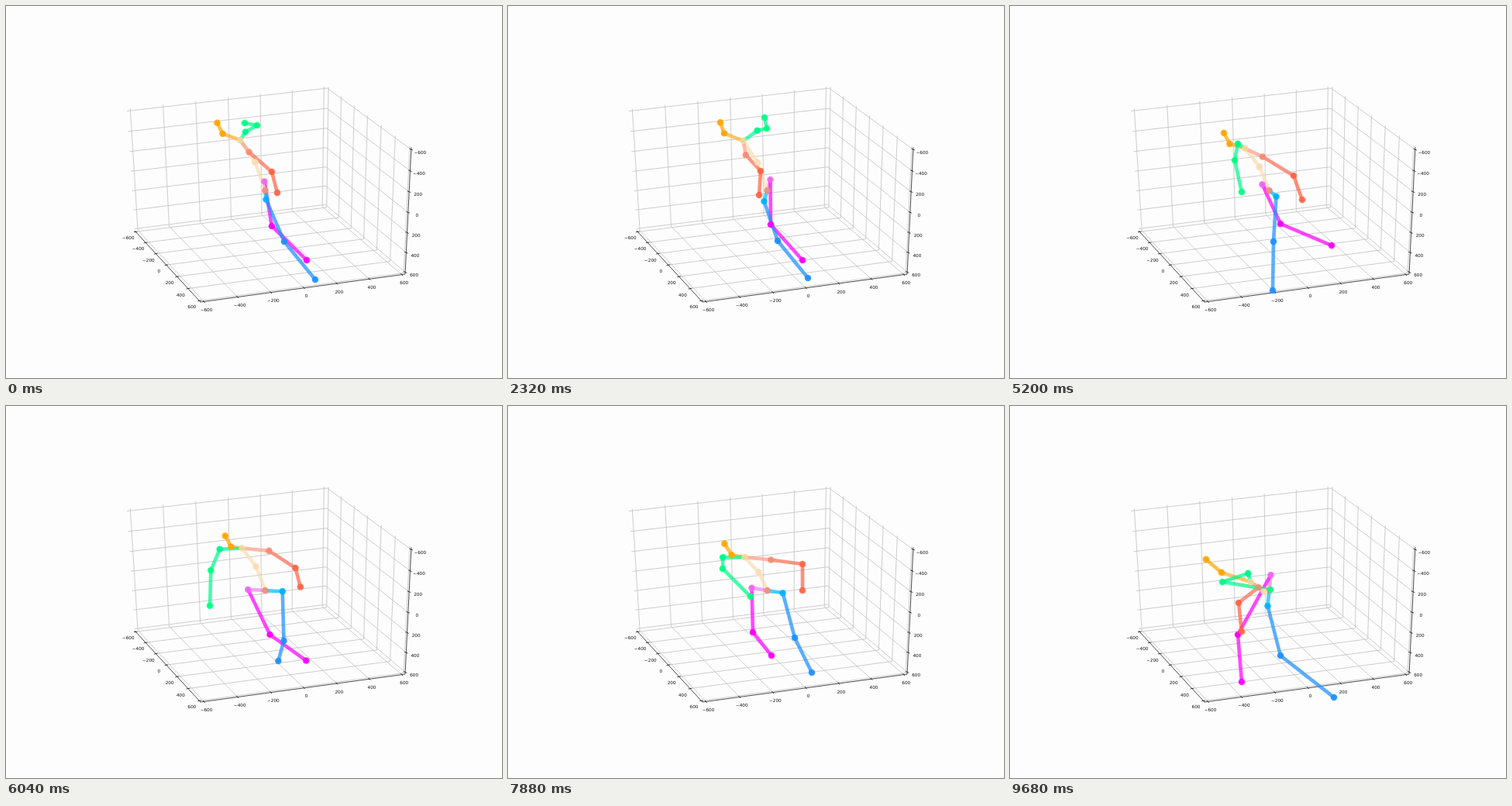
Animation, 640 px wide and 480 px high, one loop 9720 ms. Source, as an HTML page with a canvas:

```html
<!DOCTYPE html>
<html lang="en">
<head>
<meta charset="utf-8">
<title>Moving skeleton</title>
<style>
html, body { margin: 0; width: 100%; height: 100%; overflow: hidden; background: #fdfdfd; }
canvas { display: block; width: 640px; height: 480px; }
</style>
</head>
<body>
<canvas id="stage" width="640" height="480"></canvas>
<script>
const LOOP = 9720, STEP = 40;
const ctx = document.getElementById('stage').getContext('2d');

function line(c, p, q) {
  c.beginPath();
  c.moveTo(p[0], p[1]);
  c.lineTo(q[0], q[1]);
  c.stroke();
}

// ---- plot box ----
// Perspective view of the unit box: x to the right, y to the front, z up.
function project(x, y, z) {
  const w = 1 + 0.0213 * x - 0.0757 * y - 0.0478 * z;
  return [
    (166 + 255 * x + 66 * y - 17.5 * z) / w,
    (290 - 25.9 * x + 63.1 * y - 163.5 * z) / w
  ];
}

function drawPlot(c) {
  const span = (...ends) => line(c, project(...ends[0]), project(...ends[1]));
  const ticks = Array.from({ length: 7 }, (_, i) => 0.0165 + 0.967 * i / 6);

  c.lineWidth = 0.75;
  c.strokeStyle = '#bcbcbc';
  for (const k of ticks) {
    span([k, 1, 0], [k, 0, 0]);
    span([k, 0, 0], [k, 0, 1]);
    span([0, k, 0], [1, k, 0]);
    span([1, k, 0], [1, k, 1]);
    span([0, 0, k], [1, 0, k]);
    span([1, 0, k], [1, 1, k]);
  }

  c.strokeStyle = c.fillStyle = '#111';
  span([0, 0, 0], [0, 1, 0]);
  span([0, 1, 0], [1, 1, 0]);
  span([1, 1, 0], [1, 1, 1]);

  c.font = '5.7px "DejaVu Sans", sans-serif';
  c.textAlign = 'center';
  c.textBaseline = 'middle';
  const mark = ([x, y], dx, dy, text, tx, ty) => {
    line(c, [x - dx, y - dy], [x + dx, y + dy]);
    c.fillText(text, x + tx, y + ty);
  };
  ticks.forEach((k, i) => {
    const value = i * 200 - 600;
    const text = String(value).replace('-', '\u2212');
    mark(project(k, 1, 0), 1.3, 1.5, text, 3, 11);
    mark(project(0, k, 0), 2.3, -0.4, text, -9.5, 8.5);
    // The third height label carries no sign.
    mark(project(1, 1, 1 - k), 2.2, 0.9, value === -200 ? '200' : text, 11.5, 4);
  });
}

const plot = document.createElement('canvas');
plot.width = 640;
plot.height = 480;
drawPlot(plot.getContext('2d'));

// ---- motion ----
// Key poses: body turn, forward bow, and the two free joints of each limb.
const POSES = [
  { t: 3840, turn: 1, bow: 0,
    legR: [343, 284, 388, 328], legL: [359, 304, 399, 353],
    armR: [343, 214, 350, 241], armL: [324, 154, 308, 151] },
  { t: 5200, turn: 9, bow: 0.2,
    legR: [349, 281, 415, 309], legL: [340, 304, 339, 361],
    armR: [366, 219, 377, 250], armL: [290, 199, 299, 240] },
  { t: 6880, turn: 32, bow: 0.19,
    legR: [327, 309, 352, 348], legL: [377, 301, 372, 297],
    armR: [378, 199, 381, 217], armL: [249, 218, 232, 265] },
  { t: 7880, turn: 20, bow: 0.41,
    legR: [316, 292, 340, 322], legL: [370, 299, 392, 344],
    armR: [380, 204, 380, 238], armL: [277, 210, 313, 246] },
  { t: 9680, turn: -2, bow: 1,
    legR: [294, 295, 299, 356], legL: [349, 322, 418, 376],
    armR: [295, 254, 299, 291], armL: [274, 227, 336, 237] }
];

// How far a full sway moves each limb while standing.
const SWAY = {
  legR: [-4, -2, -8, 0], legL: [-11, -1, -12, -2],
  armR: [-17, -1, -26, 3], armL: [10, 4, 23, -7]
};

const clamp = (v, a, b) => Math.min(b, Math.max(a, v));
const phase = (t, a, b) => clamp((t - a) / (b - a), 0, 1);
const smooth = (t, a, b) => {
  const u = phase(t, a, b);
  return u * u * (3 - 2 * u);
};
const arc = (t, a, b) => Math.sin(Math.PI * phase(t, a, b));

// Monotone cubic between the poses, at rest at both ends.
function tween(get, t) {
  const last = POSES.length - 1;
  t = clamp(t, POSES[0].t, POSES[last].t);
  let i = 0;
  while (i < last - 1 && t >= POSES[i + 1].t) i++;
  const secant = j => (get(POSES[j + 1]) - get(POSES[j])) / (POSES[j + 1].t - POSES[j].t);
  const slope = j => {
    if (j === 0 || j === last) return 0;
    const a = secant(j - 1), b = secant(j);
    return a * b > 0 ? 2 * a * b / (a + b) : 0;
  };
  const h = POSES[i + 1].t - POSES[i].t;
  const u = (t - POSES[i].t) / h, v = 1 - u;
  return get(POSES[i]) * v * v * (1 + 2 * u) + get(POSES[i + 1]) * u * u * (3 - 2 * u)
    + h * u * v * (slope(i) * v - slope(i + 1) * u);
}

const add = ([x, y], dx, dy) => [x + dx, y + dy];
const mirror = (p, c) => [2 * c[0] - p[0], 2 * c[1] - p[1]];

function pose(t) {
  const sway = smooth(t, 0, 1000) - (smooth(t, 3000, 3840) + smooth(t, 3840, 5200)) / 2;
  const turn = tween(p => p.turn, t) - 5 * sway;
  const bow = tween(p => p.bow, t), bend = bow * bow;
  const limb = name => {
    const [x, y, ex, ey] = SWAY[name].map((s, i) => tween(p => p[name][i], t) + s * sway);
    return [[x, y], [ex, ey]];
  };

  const pelvis = [334.5, 238];
  const neck = [302 + 0.1 * turn + 9 * bend + 2 * sway, 173 + 54 * bow + sway];
  const spine = [(pelvis[0] + neck[0]) / 2 + 3 + 2 * bend,
    (pelvis[1] + neck[1]) / 2 - 4 + 11 * bend];
  const nose = add(neck, -23 + 0.42 * turn - 14 * bend, -8.5 + 0.3 * turn - 3 * bend);
  const head = add(nose, -7 - 13 * bend + 2 * sway, -14 - 3 * bend);

  // Both girdles turn about their centre, so one side mirrors the other.
  const hipR = add(pelvis, -turn, turn / 2 - 12 - 7 * bend);
  const hipL = mirror(hipR, pelvis);
  const chest = add(neck, 9.5 - 0.28 * turn - 7 * bend, 2.5 - 4.5 * bend);
  const shoulderR = add(neck, 10 + 1.6 * turn - 0.022 * turn * turn + 3 * bend,
    16 - 0.55 * turn - 10 * bend);
  const shoulderL = mirror(shoulderR, chest);

  const [kneeR, footR] = limb('legR');
  const [kneeL, stepL] = limb('legL');
  const [elbowR, handR] = limb('armR');
  const [elbowL, waveL] = limb('armL');
  const reach = arc(t, 3840, 5200);
  const handL = add(waveL, -46 * reach, -8 * reach);
  const footL = add(stepL, -30 * arc(t, 7880, 9680), 7 * arc(t, 4200, 5700));

  return { pelvis, neck, spine, nose, head, hipR, hipL, shoulderR, shoulderL,
    kneeR, footR, kneeL, footL, elbowR, handR, elbowL, handL };
}

// ---- drawing ----
// Each chain: bones from a start joint, as [joint, dot colour, bone colour].
const CHAINS = [
  ['pelvis', ['hipR', '#ee6cee', '#ee82ee'], ['kneeR', '#f800f8', '#ff00ff'],
    ['footR', '#f800f8', '#ff00ff']],
  ['pelvis', ['hipL', '#00b4ff', '#00bfff'], ['kneeL', '#1e90ff', '#1e90ff'],
    ['footL', '#1e90ff', '#1e90ff']],
  ['pelvis', ['pelvis', '#f08a78', '#f08a78'], ['spine', '#fbdcb4', '#fbdcb4'],
    ['neck', '#fad8a0', '#fbdcb4']],
  ['neck', ['shoulderR', '#f58c76', '#ffa088'], ['elbowR', '#ff6347', '#ff6f58'],
    ['handR', '#ff6347', '#ff6347']],
  ['neck', ['nose', '#ffa500', '#ffb02a'], ['head', '#ffa500', '#ffa500']],
  ['neck', ['shoulderL', '#00f58a', '#00fa9a'], ['elbowL', '#00ff7f', '#00fa8a'],
    ['handL', '#00ff7f', '#00fa8a']]
];

function draw(t) {
  const at = pose(t);

  ctx.globalAlpha = 1;
  ctx.fillStyle = '#fdfdfd';
  ctx.fillRect(0, 0, 640, 480);
  ctx.drawImage(plot, 0, 0);

  ctx.lineWidth = 4.6;
  ctx.lineCap = 'square';
  ctx.globalAlpha = 0.72;
  for (const [start, ...bones] of CHAINS) {
    let from = start;
    for (const [name, , color] of bones) {
      ctx.strokeStyle = color;
      if (name !== from) line(ctx, at[from], at[name]);
      from = name;
    }
  }
  ctx.globalAlpha = 0.88;
  for (const [, ...bones] of CHAINS) {
    for (const [name, color] of bones) {
      ctx.fillStyle = color;
      ctx.beginPath();
      ctx.arc(...at[name], 4.3, 0, 2 * Math.PI);
      ctx.fill();
    }
  }
}

function tick() {
  const t = performance.now() % LOOP;
  draw(Math.floor(t / STEP) * STEP);
  requestAnimationFrame(tick);
}
tick();
</script>
</body>
</html>
```
